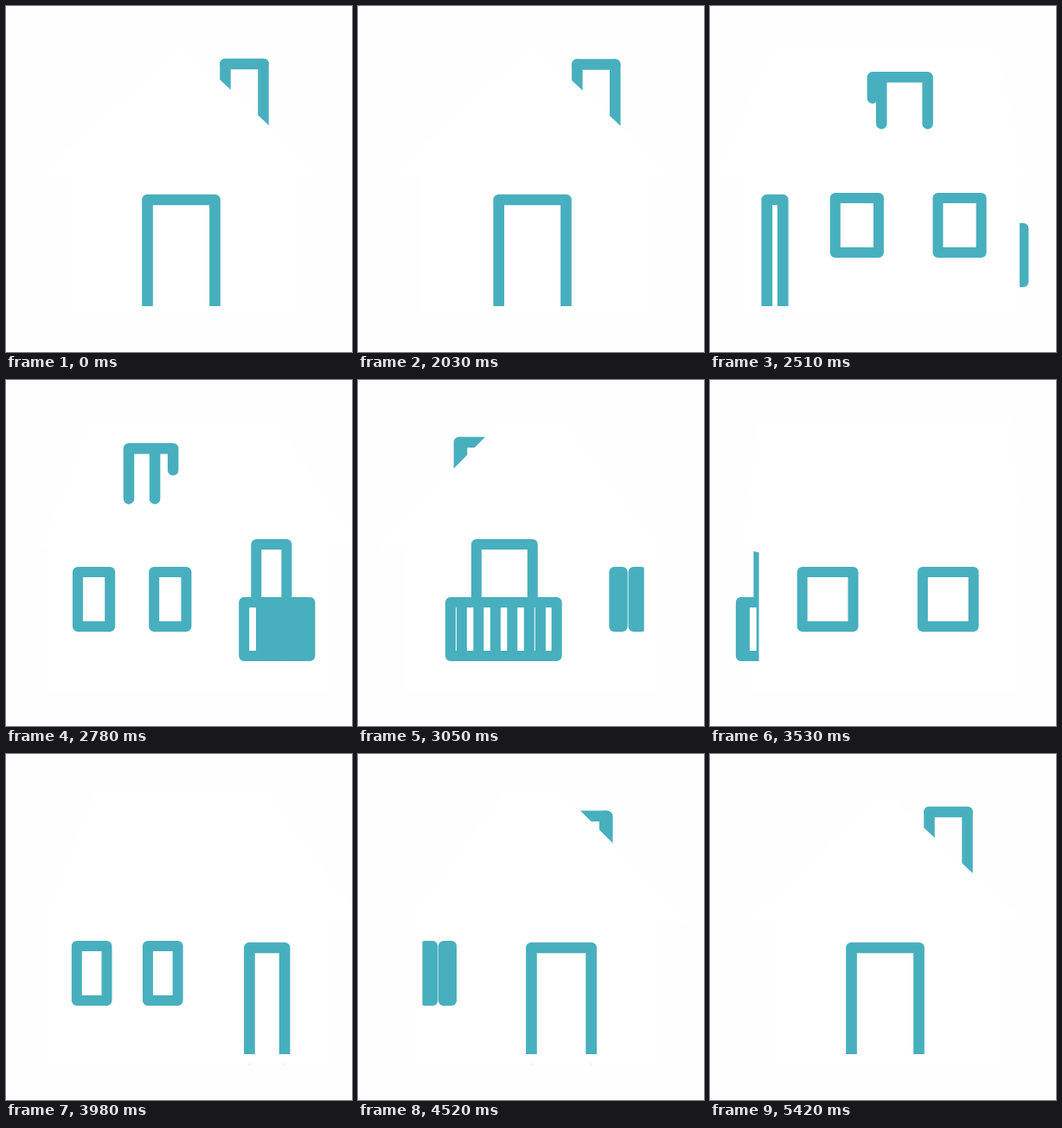
Animation of 400x400 px, one loop 5450 ms. Source, as an HTML page with a canvas:

```html
<!DOCTYPE html>
<html lang="en">
<head>
<meta charset="utf-8">
<title>Turning house</title>
<style>
  html, body { margin: 0; width: 100%; height: 100%; overflow: hidden; background: #fefefe; }
  canvas { display: block; width: 400px; height: 400px; }
</style>
</head>
<body>
<canvas id="stage" width="400" height="400"></canvas>
<script>
const ctx = document.getElementById('stage').getContext('2d');
const TEAL = '#48afbe', WHITE = '#fff', PAPER = '#fefefe';
const LOOP = 5450, REST = 2000, STEP = 30, STEPS = 114;
const CX = 202.5, RIDGE = 43.6, EAVE = 193;

// cubic-bezier(.196, 0, .248, 1)
function ease(p) {
  let lo = 0, hi = 1;
  for (let i = 0; i < 30; i++) {
    const s = (lo + hi) / 2, r = 1 - s;
    if (3 * s * r * (.196 * r + .248 * s) + s ** 3 < p) lo = s; else hi = s;
  }
  return lo * lo * (3 - 2 * lo);
}

const bump = (p, from, to) =>
  p > from && p < to ? Math.sin(Math.PI * (p - from) / (to - from)) ** 2 : 0;

// Quarter turns made so far, 0 to 4
function turnsAt(ms) {
  const p = Math.max(0, Math.floor((ms - REST) / STEP)) / STEPS;
  if (p >= 1) return 0;
  return Math.min(3.9999, 4 * ease(p) + .085 * bump(p, .35, 1));
}

function line(points, width, color = TEAL, closed = false) {
  ctx.beginPath();
  points.forEach(([x, y]) => ctx.lineTo(x, y));
  if (closed) ctx.closePath();
  ctx.lineWidth = width;
  ctx.strokeStyle = color;
  ctx.stroke();
}

function fill(points) {
  ctx.beginPath();
  points.forEach(([x, y]) => ctx.lineTo(x, y));
  ctx.fillStyle = WHITE;
  ctx.fill();
}

function box(x0, x1, y0, y1, width) {
  const pts = [[x0, y0], [x1, y0], [x1, y1], [x0, y1]];
  fill(pts);
  line(pts, width, TEAL, true);
}

const arch = (x, half, top, bottom, width) =>
  line([[x - half, bottom], [x - half, top], [x + half, top], [x + half, bottom]], width);

function post(x) {
  ctx.fillStyle = WHITE;
  ctx.fillRect(x - 6, 190, 12, 162);
}

function balcony(center, dir, u) {
  const front = 1 - u, half = 58.75 * front;
  const x = center + dir * 20 * u ** .3;
  const inner = x - dir * half;
  const end = inner - dir * 20 * (1 - Math.exp(-25 * u));
  arch(center, 36.7 * front, 190, 257, 12);
  box(Math.min(inner, end), Math.max(inner, end), 257, 319, 12);
  box(x - half, x + half, 257, 319, 12);
  for (const k of [-.75, -.375, 0, .375, .75]) {
    line([[x + k * half, 257], [x + k * half, 319]], 12);
  }
}

function chimney(side, u) {
  const top = 67 + 18 * u ** .6, half = 40 * u ** 1.5;
  const outer = CX + side * 95 * (1 - u), inner = CX + side * 51 * (1 - u);
  const outerBase = 140 - 5 * u, innerBase = 99 + 10 * u;
  arch(inner, half, top, innerBase, 12.5);
  line([[inner, top], [outer, top]], 12.5);
  fill([[outer - half, top], [outer + half, top], [outer + half, outerBase], [outer - half, outerBase]]);
  arch(outer, half, top, outerBase, 12.5);
}

// Both windows, seen only between the edges of their wall
function sideWindows(center, scale, edgeA, edgeB) {
  ctx.save();
  ctx.beginPath();
  ctx.rect(Math.min(edgeA, edgeB), 200, Math.abs(edgeA - edgeB), 140);
  ctx.clip();
  for (const k of [-1, 1]) {
    const x = center + k * 71 * scale;
    box(x - 30 * scale, x + 30 * scale, 222, 285, 12);
  }
  ctx.restore();
}

function draw(turns) {
  const quarter = Math.floor(turns), part = turns - quarter;
  const dir = quarter % 2 ? 1 : -1;
  const u = quarter % 2 ? 1 - part : part;       // 0 gable view, 1 long side view
  const showsBack = quarter === 1 || quarter === 2;
  const chimneySide = showsBack ? -1 : 1;

  const front = 1 - u, long = u + .4 * u * front;
  const shift = u * (319 - 290 * u + 119 * u * u);
  const gable = CX + dir * shift, farGable = CX - dir * shift;
  const side = CX - dir * 125 * front ** 1.07;
  const gableEdge = gable + dir * 121.5 * front;
  const corner = side + dir * 146 * long;
  const sideEdge = side - dir * (146 * long + 2 * front);
  const eaveHalf = 154 * front ** .6;

  ctx.fillStyle = PAPER;
  ctx.fillRect(0, 0, 400, 400);
  ctx.lineJoin = ctx.lineCap = 'round';

  // Parts behind the house
  if (!showsBack) balcony(farGable, -dir, u);
  if (quarter >= 2) chimney(chimneySide, u);

  // Walls and roof
  fill([[gableEdge, 190], [sideEdge, 190], [sideEdge, 352], [gableEdge, 352]]);
  post(gableEdge);
  post(sideEdge);
  fill([[gable, RIDGE], [farGable, RIDGE], [sideEdge - dir * 12, EAVE], [corner, EAVE]]);
  if (quarter < 2) chimney(chimneySide, u);
  fill([[gable, RIDGE], [gable + eaveHalf, 187], [gable + eaveHalf, 195],
        [gable - eaveHalf, 195], [gable - eaveHalf, 187]]);

  // Gable end
  if (showsBack) {
    balcony(gable, dir, u);
  } else {
    arch(gable, 39 * front, 224, 352, 12.7);
    post(gableEdge);
  }

  // Long side
  fill([[corner, 190], [sideEdge, 190], [sideEdge, 352], [corner, 352]]);
  if (u > .05) {
    post(corner);
    line([[corner + dir * 8 * u, EAVE - 3], [sideEdge, EAVE - 3]], 18, WHITE);
  }
  sideWindows(side, long, corner, sideEdge);
  post(sideEdge);

  // Ground beam
  ctx.fillStyle = WHITE;
  ctx.fillRect(Math.min(gableEdge, sideEdge) - 6, 347,
    Math.abs(gableEdge - sideEdge) + 12, u > .05 ? 11 : 12);
}

const start = performance.now();
function frame() {
  draw(turnsAt((performance.now() - start) % LOOP));
  requestAnimationFrame(frame);
}
frame();
</script>
</body>
</html>
```
